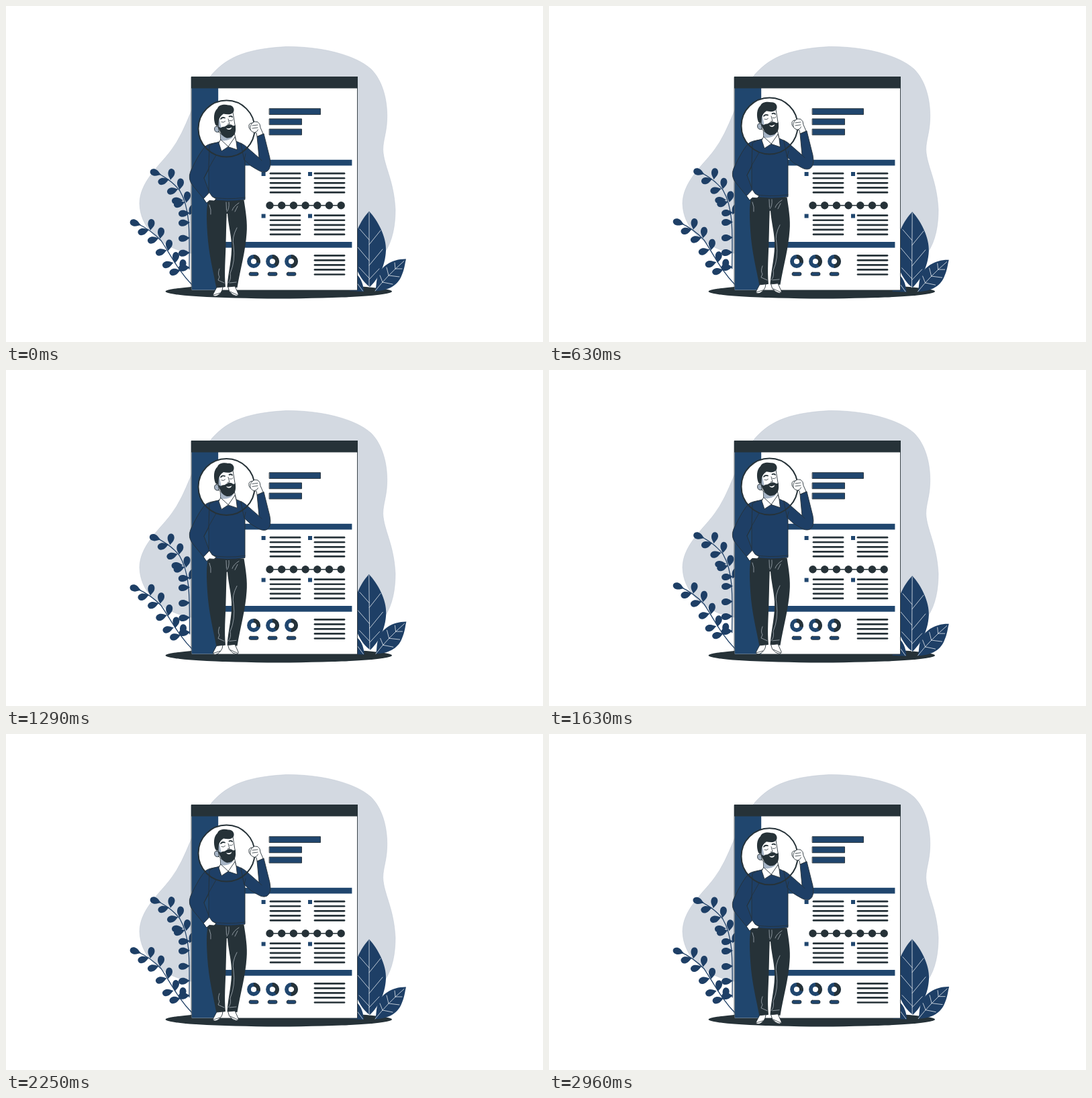
Write an HTML page that moves like this. It is 800 px wide and 500 px high and loops after 3000 ms.

```html
<!DOCTYPE html>
<html lang="en">
<head>
<meta charset="utf-8">
<title>Resume illustration</title>
<style>
  html, body { margin: 0; width: 100%; height: 100%; overflow: hidden; background: #fff; }
  svg { display: block; width: 100vw; height: 100vh; }
  .navy { fill: #20466e; }
  .deep { fill: #1e3f66; }
  .dark { fill: #263238; }
  .white { fill: #fff; }
  .shade { fill: #a6b4c5; }
  .ink { stroke: #263238; stroke-width: .9; stroke-linejoin: round; stroke-linecap: round; }
  .line { fill: none; stroke: #263238; stroke-width: .8; stroke-linecap: round; stroke-linejoin: round; }
  .brow { stroke-width: 1.8; }
  .vein { fill: none; stroke: #e6ebf0; stroke-width: .8; stroke-linecap: round; }
  .crease { stroke: #b9c2ca; stroke-width: .7; }
  .stem { fill: none; stroke: #1e3f66; stroke-width: 1.3; }
  .row { stroke: #263238; stroke-width: 2.7; stroke-linecap: round; }
</style>
</head>
<body>
<svg viewBox="0 0 800 500">
  <path fill="#d3d9e1" stroke="#bcc5d0" stroke-width=".5" d="M304 105C326 79 352 64 417 60.500C470 60 521 73 544 94
    C562 112 569 143 567.500 170C567 190 560 204 562 219C565 242 578 262 580 303C580 326 576 350 564 367
    C540 396 480 394 420 390C360 382 320 372 276 368C246 364 200 340 199 294C199 262 229 237 245 216C272 181 277 139 304 105Z"/>
  <ellipse class="dark" cx="406.300" cy="424.800" rx="168.800" ry="10.600"/>

  <g id="plants">
    <g id="sprigs">
      <path class="stem" d="M194 323Q216 333 231 349C247 373 255 392 279 417"/>
      <path class="stem" d="M222 247Q246 258 259 275C276 304 273 345 273 392"/>
    </g>
    <path class="deep" d="M533 425C532 412 528 402 518 396L512 424Z"/>
    <path class="vein" d="M522 411L531.500 424"/>
    <path class="deep" d="M541 305.500C554 319 567 344 566 364C565 389 553 408 542 418C529 409 518 389 517 364C517 342 528 319 541 305.500Z"/>
    <path class="vein" d="M541 307V418M541 348L527 332M541 355L558 334M541 379L524 359M541 386L561 362M541 405L526 389M541 407L556 391"/>
    <path class="deep" d="M596 376.500C576 376 558 387 553.500 403C551 412 552 418 550 424C567 424 583 417 589 402C594 391 594 384 596 376.500Z"/>
    <path class="vein" d="M593 379.500Q568 401 550 424M580 391L579 382M580 391L590 391M570 401L567 389M570 401L586 403M561 411L557 401M561 411L576 414"/>
  </g>

  <g id="board">
    <rect class="white ink" x="276.500" y="105.500" width="247" height="317.500"/>
    <rect class="navy" x="276.800" y="122" width="39.400" height="300.500"/>
    <rect class="dark" x="276" y="105" width="248" height="17.500"/>
  </g>

  <g id="man">
    <circle class="white" cx="328.500" cy="182.600" r="42"/>

    <!-- neck and head -->
    <path class="white ink" d="M319 184L320 206L331 213L343 202L340 188Z"/>
    <path class="shade" d="M319.500 186L320 200Q331 202 338 195Z"/>
    <path class="white ink" d="M313 164Q312 178 317 187Q324 196 334 194Q342 190 341.500 180L338 158Q326 152 315 158Z"/>
    <path class="shade" d="M315 166L318 169L321 182L317 185Q314 177 315 166Z"/>
    <path class="shade ink" d="M316 180Q311 177 310.500 183Q311 189 317 187.500Z"/>
    <path class="dark" d="M312 177C308.500 168 309.500 157 315 152.500C317 147 325 146 331 147.500C338 147 341 153 339 157.500
      C336 162.500 329 161.500 324 160.500C320 163 318 166 317 170L316.500 179Z"/>
    <path class="dark" d="M315 175Q318 184 322 180Q326 180 329 177.500Q335 175 338 178Q340 179 341.500 177Q343 184 341 190Q337 197 329 196.500Q319 194 315 175Z"/>
    <path class="white" d="M328 181.500Q332 183.500 336.500 180.500Q335 184.500 331.500 184Q329 183.500 328 181.500Z"/>
    <path class="line brow" d="M320 168Q322 165 326 166.500M332.500 164.500Q335 163 337 165"/>
    <path class="line" d="M321 172.500Q324 174.500 326.500 171.500M333 170.500Q336 172 338 169.500M331 168L333 175.500L330 176"/>

    <!-- trousers -->
    <path class="dark" d="M301 289L354.500 289C357 305 360 323 358.500 338C357 364 349 392 344.500 419L329.500 418
      C331 395 337 376 336 354C335 338 331 324 330 309L328.800 309C328 325 328 340 327.500 354C327 376 325 398 327 418L313.500 420
      C309 396 302 370 300 338C299 320 298 303 301 289Z"/>
    <path class="vein crease" d="M328 292L328.500 304M332 292Q333 302 329 306M337 304Q339 298 347 293M341 306L345 298
      M303 296Q306 303 305 310M344 330Q336 345 339 357Q342 379 334 398Q336 407 331 412M333 412L343 411
      M318 391Q315 399 318 403L316 408L325 412"/>

    <!-- shoes -->
    <path class="white ink" d="M314 419L323 418L322 423Q318 431 312 432Q307 432 309 428Z"/>
    <path class="white ink" d="M331 418L341 417L345 426Q348 431 343 431.500Q338 431 333 425Z"/>
    <path class="line" d="M309 430L319 427M334 425L345 430"/>

    <!-- body and pocketed arm -->
    <path class="deep ink" d="M318 203Q304 204 298 208Q289 216 275 246Q270 258 279 268L294.500 287L303 277.500L295 256L308 232Z"/>
    <path class="deep ink" d="M318 202Q308 204 303 208L302 240L302 287Q330 293 356 288L356 222L357 211Q352 204 342 201Q337 208 331 210Q323 208 318 202Z"/>
    <path class="line" d="M313 222Q302 240 295 256M302 284Q329 289 356 285"/>
    <path class="white ink" d="M294.500 286.500L303 277.500L307 283.500L313 287L310 290L303 289.500L299 293Z"/>

    <!-- raised arm -->
    <path class="deep ink" d="M350 204Q356 207 361 212L377 226L374 194L384 190L393 226Q396 241 389 246Q383 249 375 244Q364 239 355 229Z"/>
    <path class="line" d="M377 226L381 230M355 229L357 220"/>

    <!-- collar -->
    <path class="white ink" d="M319.500 199L317 204L321 216L331 209.500Z"/>
    <path class="white ink" d="M341 195L331 209.500L344.500 214L343 202Z"/>

    <circle fill="none" stroke="#263238" stroke-width="2" cx="328.500" cy="182.600" r="42"/>

    <!-- gripping hand -->
    <path class="white ink" d="M374 194L373 189Q366 188 364 184Q361 182 362 177Q363 174 367 174Q370 171 375 172.500Q379 175 379 181L383 190Z"/>
    <path class="line" d="M367 174Q363 178 364 184M367 178L375 177M367 182L375 181M371 188Q375 187 375.500 184"/>
  </g>
</svg>

<script>
const NS = 'http://www.w3.org/2000/svg';
const $ = id => document.getElementById(id);

function add(parent, tag, attrs) {
  const el = document.createElementNS(NS, tag);
  for (const key in attrs) el.setAttribute(key, attrs[key]);
  parent.appendChild(el);
}

// Teardrop leaf growing from a point on the stem
function leaf(x, y, angle) {
  add($('sprigs'), 'path', {
    class: 'deep',
    d: 'M0 0C4 -2 6 -5 11 -5C15 -5 17 -2.500 17 0C17 3 14 5 11 5C6 5 4 2 0 0Z',
    transform: `translate(${x} ${y}) rotate(${angle})`
  });
}

leaf(201, 326, 199);
leaf(231, 251, 199);
const pairs = [[215, 334], [229.5, 346.5], [241.5, 364.5], [251.5, 383], [262, 394],
               [245, 259], [258.5, 273.5], [268.5, 293]];
for (const [x, y] of pairs) {
  leaf(x, y, -82);
  leaf(x - 2, y - 1, 164);
}
leaf(264, 289, 176);
for (const y of [308, 322, 345, 367, 389]) leaf(274, y, 176);
leaf(273, 311, -62);

const board = $('board');
const box = (x, y, width, height, cls = 'navy', rx = 0) =>
  add(board, 'rect', { x, y, width, height, rx, class: cls });

function rows(x, y) {
  for (let i = 0; i < 5; i++) {
    const ry = y + i * 7.05;
    add(board, 'line', { x1: x, x2: x + 44, y1: ry, y2: ry, class: 'row' });
  }
}

[76, 48, 48].forEach((w, i) => box(392.5, 152.7 + i * 15.2, w, 8.8, 'navy ink'));
for (const y of [228.8, 351]) box(325, y, 190.4, 8.7);

for (const y of [249.2, 311.7]) {
  rows(394, y);
  rows(460, y);
  for (const x of [380.6, 450]) box(x, y - 2.2, 6, 6);
}
rows(460, 371.3);

add(board, 'line', { x1: 393, x2: 499, y1: 296.7, y2: 296.7, stroke: '#263238', 'stroke-width': 1.5 });
for (let i = 0; i < 7; i++)
  add(board, 'circle', { cx: 393 + i * 17.7, cy: 296.7, r: 5.7, class: 'dark' });

[0.3, 0.4, 0.5].forEach((part, i) => {
  const cx = 369 + i * 28, cy = 380, r = 7;
  const ring = { cx, cy, r, fill: 'none', 'stroke-width': 5.8 };
  add(board, 'circle', { ...ring, stroke: '#20466e' });
  add(board, 'circle', {
    ...ring, stroke: '#263238', pathLength: 1,
    'stroke-dasharray': `${part} 1`, transform: `rotate(-90 ${cx} ${cy})`
  });
  box(cx - 7, 396.3, 14, 5, 'navy ink', 2.5);
});

// The man floats over the whole loop; the plants sway twice in it.
const LOOP = 3000, SWAY = 1500, STEP = 1000 / 24;
const triangle = p => 1 - Math.abs(2 * p - 1);
const swing = p => p < .25 ? 4 * p : p < .75 ? 2 - 4 * p : 4 * p - 4;

function draw(now) {
  const t = Math.floor((now % LOOP + 5) / STEP) * STEP % LOOP;
  $('man').setAttribute('transform', `translate(0 ${-10 * triangle(t / LOOP)})`);
  $('plants').setAttribute('transform', `rotate(${swing(t % SWAY / SWAY)} 391 333)`);
}

let start;
function tick(now) {
  start ??= now;
  draw(now - start);
  requestAnimationFrame(tick);
}
draw(0);
requestAnimationFrame(tick);
</script>
</body>
</html>
```
